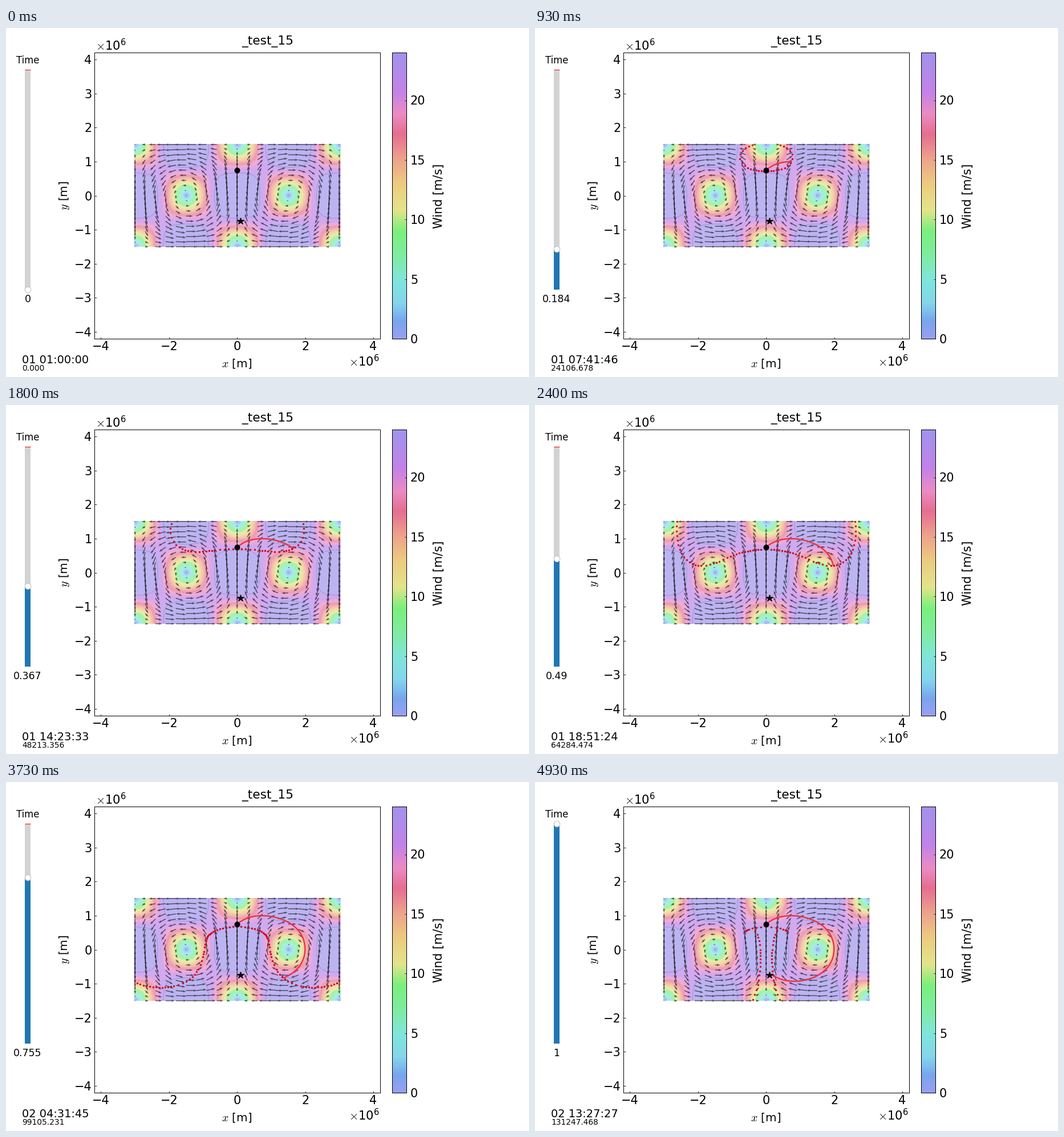
Write a matplotlib script that moves like this. It is 917 px wide and 611 px high and loops after 5.06 s.

```python
import numpy as np
import matplotlib.pyplot as plt
from matplotlib.animation import FuncAnimation
from matplotlib.colors import LinearSegmentedColormap
from matplotlib.patches import Rectangle

plt.rcParams.update({
    "font.family": "DejaVu Sans",
    "mathtext.fontset": "cm",
    "axes.linewidth": 1,
    "toolbar": "None",
})

WIDTH, HEIGHT, DPI = 917, 611, 72        # at 72 dpi a point is a pixel
INTERVAL, LOOP = 20, 5060
STEPS, DURATION = 49, 131247.468         # animation steps, simulated seconds
WIND, AIRSPEED = 30e-6, 23e-6            # Mm/s
K = np.pi / 3                            # wave number, 1/Mm
START, GOAL = (0, 0.75), (0.1, -0.75)    # Mm
RAYS, STRIDE, SUBSTEPS, MAX_GAP = 2560, 64, 6, 0.155
BAR_MAX = 24


def wind(x, y):
    return (WIND * np.sin(K * x) * np.sin(K * y),
            WIND * np.cos(K * x) * np.cos(K * y))


def zermelo(state):
    """Time-optimal motion: position drifts with the wind, heading follows shear."""
    x, y, heading = state
    u, v = wind(x, y)
    turn = WIND * K * (np.sin(2 * heading) * np.cos(K * x) * np.sin(K * y)
                       - np.sin(K * x) * np.cos(K * y))
    return np.array([u + AIRSPEED * np.cos(heading),
                     v + AIRSPEED * np.sin(heading), turn])


def integrate():
    heading = -np.pi / 2 + 2 * np.pi * np.arange(RAYS) / RAYS
    state = np.array([np.full(RAYS, START[0]), np.full(RAYS, START[1]), heading])
    dt = DURATION / STEPS / SUBSTEPS
    history = [state]
    for _ in range(STEPS * SUBSTEPS):
        a = zermelo(state)
        b = zermelo(state + a * dt / 2)
        c = zermelo(state + b * dt / 2)
        d = zermelo(state + c * dt)
        state = state + dt / 6 * (a + 2 * b + 2 * c + d)
        history.append(state)
    return np.array(history)


def build_fronts(history):
    """Dots of the reachable front per step, with rays inserted where they spread."""
    alive = np.ones(RAYS, bool)
    active = np.arange(RAYS) % STRIDE == 0
    fronts = [np.array([START], float)]
    for n in range(1, len(history)):
        x, y, heading = history[n]
        dx = np.roll(x, -1) - np.roll(x, 1)
        dy = np.roll(y, -1) - np.roll(y, 1)
        alive &= (abs(x) < 3) & (abs(y) < 1.5)
        alive &= np.cos(heading) * dy - np.sin(heading) * dx > 0
        if n % SUBSTEPS:
            continue
        for _ in range(3):
            left = np.flatnonzero(active)
            right = np.roll(left, -1)
            span = (right - left) % RAYS
            gap = np.hypot(x[right] - x[left], y[right] - y[left])
            split = (gap > MAX_GAP) & (span > 1) & (alive[left] | alive[right])
            active[(left[split] + span[split] // 2) % RAYS] = True
        shown = active & alive
        if n * DURATION / (len(history) - 1) > 45000:
            shown &= ~((abs(x) < 1) & (y > y[0] + 0.01))
        fronts.append(np.column_stack([x[shown], y[shown]]))
    return fronts, alive


history = integrate()
fronts, alive = build_fronts(history)
miss = np.hypot(history[-1, 0] - GOAL[0], history[-1, 1] - GOAL[1])
best = np.argmin(np.where(alive & (history[-1, 0] > 0), miss, np.inf))
route = history[:, :2, best]

stops = [(0, 154, 160, 240), (1.4, 120, 165, 238), (3, 132, 214, 236),
         (5, 128, 230, 218), (7, 128, 236, 160), (9, 122, 240, 125),
         (10.8, 228, 228, 140), (13.1, 236, 202, 128), (15, 238, 165, 140),
         (17.2, 230, 110, 145), (18.9, 235, 140, 195), (20.8, 195, 130, 232),
         (24, 160, 148, 236)]
cmap = LinearSegmentedColormap.from_list(
    "wind", [(s[0] / BAR_MAX, tuple(c / 255 for c in s[1:])) for s in stops], 512)

fig = plt.figure(figsize=(WIDTH / DPI, HEIGHT / DPI), dpi=DPI, facecolor="white")


def add_axes(left, top, right, bottom):
    return fig.add_axes([left / WIDTH, 1 - bottom / HEIGHT,
                         (right - left) / WIDTH, (bottom - top) / HEIGHT])


# Map
ax = add_axes(154.5, 43, 656, 544)
ex, ey = 3.026, 1.508
gx, gy = np.meshgrid(np.linspace(-ex, ex, 361), np.linspace(-ey, ey, 180))
speed = np.hypot(*wind(gx, gy)) * 1e6
pixels = cmap(np.clip(speed / BAR_MAX, 0, 1))
pixels[..., :3] = 0.3 + 0.7 * pixels[..., :3]
ax.imshow(pixels, extent=(-ex, ex, -ey, ey), origin="lower",
          interpolation="nearest", aspect="auto", zorder=0)
ax.contour(gx, gy, speed, levels=[AIRSPEED * 1e6], colors="#9a86cc",
           linewidths=1.4, alpha=0.5, zorder=1)
qx, qy = np.meshgrid(np.linspace(-3, 3, 21), np.linspace(-1.5, 1.5, 21))
qu, qv = wind(qx, qy)
ax.quiver(qx, qy, qu * 1e6, qv * 1e6, color="black", alpha=0.6,
          headwidth=2.6, headlength=4, headaxislength=3.6, zorder=2)
ax.set(xlim=(-4.2, 4.2), ylim=(-4.2, 4.2),
       xticks=range(-4, 5, 2), yticks=range(-4, 5))
ax.tick_params(direction="in", length=3.5, width=0.8, labelsize=20.9, pad=4)

trail, = ax.plot([], [], color="#f0303c", lw=2.4, zorder=3)
dots, = ax.plot([], [], "o", color="#d4000f", ms=3.4, mew=0, zorder=4)
ax.plot(*START, "o", color="black", ms=10, mew=0, zorder=5)
ax.plot(*GOAL, "*", color="black", ms=13, mew=1.3, zorder=5)

# Colour bar
bar = add_axes(676.5, 43, 702, 544)
bar.imshow(cmap(np.linspace(0, 1, 501))[:, None], extent=(0, 1, 0, BAR_MAX),
           origin="lower", aspect="auto", interpolation="nearest")
bar.set(xticks=[], yticks=range(0, 21, 5), ylim=(0, BAR_MAX))
bar.yaxis.tick_right()
bar.tick_params(direction="in", length=3.5, width=0.8, labelsize=20.9, pad=7)

# Labels and slider, placed in pixels from the top left
ui = add_axes(0, 0, WIDTH, HEIGHT)
ui.set(xlim=(0, WIDTH), ylim=(HEIGHT, 0))
ui.axis("off")


def label(x, y, text, size, ha="left", va="baseline", **style):
    return ui.text(x, y, text, fontsize=size, ha=ha, va=va, **style)


POWER = r"$\times\mathdefault{10^{6}}$"
label(459, 29, "_test_15", 21.8, "center")
label(157, 39, POWER, 21)
label(655, 592, POWER, 21, "right")
label(405, 594, r"$x$ [m]", 20, "center")
label(103, 293.5, r"$y$ [m]", 20, "center", "center", rotation=90)
label(759, 294, "Wind [m/s]", 20.9, "center", "center", rotation=90)
label(38, 62, "Time", 16.5, "center")
value_text = label(38, 480, "", 17.4, "center")
clock_text = label(28, 587, "", 19.4)
seconds_text = label(28, 600, "", 13.7)

TOP, BOTTOM = 73, 458
ui.add_patch(Rectangle((33, TOP), 10, BOTTOM - TOP, fc="lightgrey", lw=0))
fill = ui.add_patch(Rectangle((33, BOTTOM), 10, 0, fc="tab:blue", lw=0))
ui.plot([33, 43], [TOP, TOP], color="red", lw=1, solid_capstyle="butt")
handle, = ui.plot([38], [BOTTOM], "o", ms=10.5, mfc="white", mec="0.75", mew=1)


def slider_format(value):
    digits = 2 if abs(value - round(value, 2)) < 1e-3 else 3
    return f"{round(value, digits):g}"


def step_at(ms):
    """Steps last 130 ms and 70 ms in turn."""
    return min(STEPS, int(2 * (ms // 200) + (ms % 200 >= 130)))


def update(frame):
    step = step_at((frame + 0.5) * INTERVAL)
    value = step / STEPS
    elapsed = value * DURATION
    trail.set_data(*route[:step * SUBSTEPS + 1].T)
    dots.set_data(*fronts[step].T)
    level = BOTTOM - value * (BOTTOM - TOP)
    fill.set_height(level - BOTTOM)
    handle.set_ydata([level])
    total = int(elapsed) + 3600
    days, rest = divmod(total, 86400)
    value_text.set_text(slider_format(value))
    clock_text.set_text(f"{days + 1:02d} {rest // 3600:02d}:"
                        f"{rest // 60 % 60:02d}:{rest % 60:02d}")
    seconds_text.set_text(f"{elapsed:.3f}")
    return trail, dots, fill, handle, value_text, clock_text, seconds_text


anim = FuncAnimation(fig, update, frames=LOOP // INTERVAL, interval=INTERVAL,
                     repeat=True, repeat_delay=0, blit=False)
plt.show()
```
